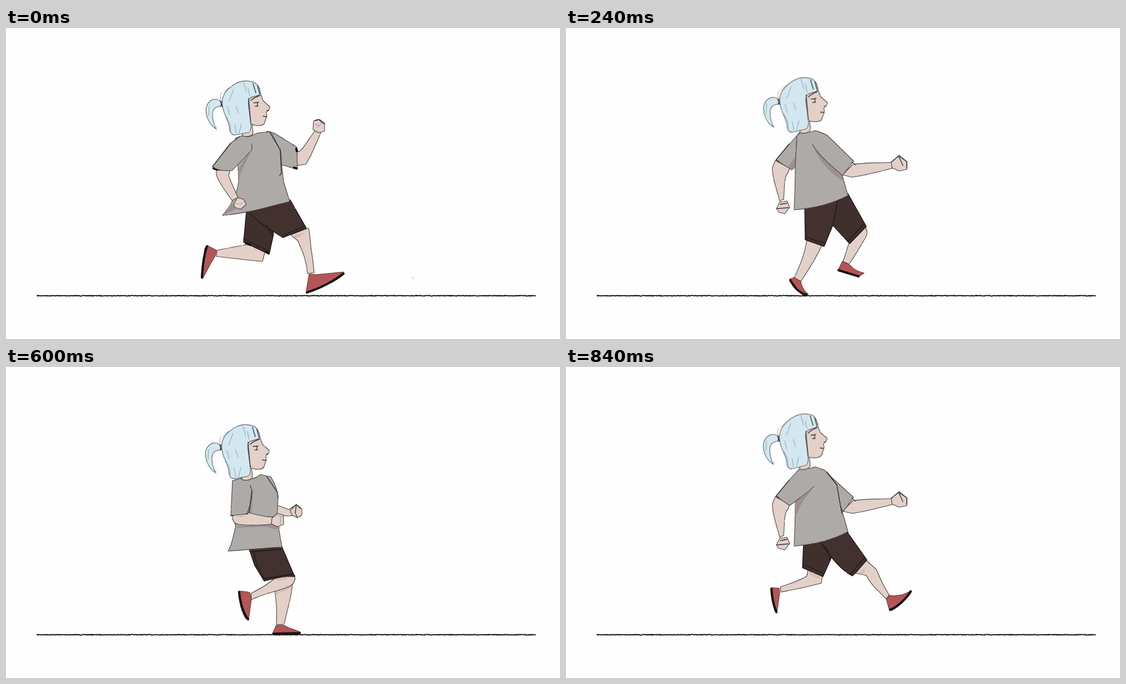
Recreate the animation shown at these times as an HTML page. Size 998x561 px, loop 960 ms.

```html
<!DOCTYPE html>
<html lang="en">
<head>
<meta charset="utf-8">
<title>Run cycle</title>
<style>
html, body { margin: 0; width: 100%; height: 100%; overflow: hidden; background: #fefefe; }
svg { display: block; width: 100%; height: 100%; }
path { fill: none; stroke: #4b4442; stroke-width: 1.1; stroke-linejoin: round; stroke-linecap: round; }
.skin { fill: #e2d0c9; }
.hair { fill: #d3e7f1; stroke: #59656d; }
.shirt { fill: #aeaaa7; stroke: #494543; }
.shade { fill: #9b918e; stroke: none; }
.blush { fill: #d8beb5; stroke: none; }
.near { fill: #43312f; stroke: #1f1716; stroke-width: 1.4; }
.far { fill: #40302d; stroke: #1f1716; stroke-width: 1.4; }
.fold { stroke: #1f1716; stroke-width: 1.3; }
.shoe { fill: #b55558; stroke: #6d3536; }
.sole { stroke: #161313; stroke-width: 4.2; }
.ink { stroke: #37312f; stroke-width: 1.35; }
.strand { stroke: #8698a2; stroke-width: .9; }
.ground { stroke: #111; stroke-width: 1.8; }
</style>
</head>
<body>
<svg id="stage" viewBox="0 0 998 561">
  <filter id="pencil" filterUnits="userSpaceOnUse" x="340" y="70" width="300" height="420" color-interpolation-filters="sRGB">
    <feTurbulence type="fractalNoise" baseFrequency=".25" numOctaves="2" seed="4"/>
    <feDisplacementMap in="SourceGraphic" scale="1.7" xChannelSelector="R" yChannelSelector="G"/>
  </filter>
</svg>
<script>
const NS = 'http://www.w3.org/2000/svg';
const stage = document.getElementById('stage');
const STEP = 120;

function add(parent, tag, attrs) {
  const el = document.createElementNS(NS, tag);
  for (const name in attrs) el.setAttribute(name, attrs[name]);
  return parent.appendChild(el);
}

// Each part is "class path-data", listed from back to front.
function draw(parent, parts, transform = '') {
  const g = add(parent, 'g', { transform });
  for (const part of parts) {
    const cut = part.indexOf(' ');
    add(g, 'path', { class: part.slice(0, cut), d: part.slice(cut + 1) });
  }
}

const head = [
  'skin M428 188L443 172L445 188C445 195 434 198 425 194Z',
  'skin M436 127L459 120L463 131L475 142C477 146 471 149 469 152L470 159L465 173C460 177 451 177 439 173Z',
  'hair M388 133C380 126 367 126 361 142C358 157 366 174 378 182C371 165 370 150 376 145C380 141 385 142 388 141Z',
  'hair M403 108C415 97 430 92 447 98C455 102 458 111 459 120L442 125C436 128 436 134 437 142L441 172C442 184 440 188 434 189L413 193C404 193 403 187 402 176C398 162 391 153 390 140C388 126 394 115 403 108Z',
  'strand M428 98L433 116M410 111L402 132M399 142L403 157M414 140L419 154M424 173L420 190M412 174L415 190M366 140L365 158M372 164L376 177M436 108L439 122',
  'ink M445 100L450 117M453 104L457 119M437 127L441 172M386 132L390 142M388 133L387 142',
  'strand M402 107L392 116M389 132C384 124 386 121 389 117M379 178L379 184M398 161L404 174L405 190',
  'ink M441 131Q447 125 457 122M446 135L455 134M449 141L454 141M453 134L453 140M463 159L469 160M470 149L473 149',
];

const shoes = {
  contact: [
    'skin M434 388C446 394 457 396 467 402L462 421C440 419 405 415 379 412L380 401C400 397 420 393 434 391Z',
    'shoe M362 392L379 401L377 411C368 425 361 440 354 452L352 447L358 398Z',
    'sole M362 394C356 410 354 432 353 450',
    'skin M513 373L545 361L547 371C548 395 554 420 555 442L543 443C541 415 532 400 526 384Z',
    'shoe M546 444L558 445L608 440C600 451 570 466 545 477L541 474Z',
    'sole M542 477C565 470 592 456 608 443',
    'blush M514 375L539 368L530 377L523 378Z', 'blush M438 391L458 395L465 402L447 397Z',
  ],
  flight: [
    'skin M436 364L462 376L460 390C436 396 410 402 387 406L386 397C405 390 425 384 434 377Z',
    'shoe M370 398L384 399L385 407L380 443L376 440Z',
    'sole M370 400C371 415 374 431 379 442',
    'skin M522 372L541 349L559 365C566 382 575 400 582 411L577 419C565 405 550 395 541 376Z',
    'shoe M577 418L583 412C600 414 612 410 622 403C622 411 600 431 587 439L582 437Z',
    'sole M584 438C596 434 613 418 621 405',
    'blush M527 371L539 363L537 374Z', 'blush M437 368L459 379L455 382L438 375Z',
  ],
};

const swingShoe = [
  'shoe M419 404L439 406L442 419L437 456L432 454C424 440 419 420 419 404Z',
  'sole M420 406C422 426 427 444 436 455',
];
const standLeg = [
  'skin M481 386L517 382C516 410 506 440 501 464L487 465C489 440 487 415 481 386Z',
  'shoe M487 466L501 466C512 473 526 475 531 479L480 481Z',
  'sole M482 481L529 480',
];

const contactTorso = 'shirt M413 199C422 194 429 194 434 196C441 197 447 191 455 189L477 187L495 222L497 250L500 277L511 313C480 320 440 334 390 338C402 325 417 300 419 277L418 250Z';
const contactBack = 'skin M379 257C377 266 385 278 391 288L407 311L418 306C412 292 405 278 401 266L404 256Z';
const contactFront = [
  'skin M523 218C528 232 536 214 556 186L567 189C560 206 549 232 540 246L524 248Z',
  'skin M553 183L554 168L565 165L574 172L574 186L563 189Z',
  'strand M555 173L565 176L568 170M559 179L565 176',
  'ink M556 167L563 165L573 173',
];
const cuffs = 'sole M374 253L382 256M523 218L524 222M519 252L523 253';

const nearArmBack = [
  ...contactFront,
  'shirt M470 186L484 190L524 215L525 255L497 247L480 220Z',
  contactTorso,
  'shade M441 223C430 235 424 245 418 258L419 278C423 256 434 240 441 223Z',
  'shade M406 314L394 336L414 327Z',
  cuffs,
  contactBack,
  'shirt M421 196L404 208L372 250C380 257 395 258 407 257C418 247 431 233 443 220L443 209',
  'ink M475 188L494 220L496 262L493 266M372 250L404 209',
  'skin M410 318L417 306L428 309L433 318L423 327L413 324Z',
  'strand M412 317L424 317L431 312',
];
const nearArmFront = [
  contactBack,
  'shirt M424 196L404 208L372 250C380 257 395 258 407 257L418 243Z',
  'shade M418 233L400 256L408 257L418 247Z',
  contactTorso,
  'shade M443 223L497 249L499 273C480 263 460 246 443 223Z',
  cuffs,
  ...contactFront,
  'shirt M448 190L484 190L525 217L523 255C499 247 465 243 439 219',
  'ink M424 197C421 215 418 230 418 248M372 250L404 209M498 250L494 262',
];

const passTop = [
  'skin M487 249L510 257L517 252L517 268C507 270 496 268 486 265Z',
  'skin M512 259L523 248L533 256L533 267L525 272L515 267Z',
  'ink M516 254L523 248L521 264L525 271M524 249L530 255',
  'shirt M409 205L426 200C440 204 450 202 458 194L477 198C485 211 490 225 490 237L488 271L497 325C470 326 430 330 400 332C408 320 410 300 414 287L407 266Z',
  'shade M443 222L434 264L441 266C445 250 444 236 443 222Z',
  'shade M415 287L485 284L495 290L485 293L470 288L417 290Z',
  'skin M408 265C406 276 412 284 420 284C440 287 465 285 486 283L489 268C481 273 465 270 434 262Z',
  'blush M411 269L436 264L425 271Z',
  'shirt M426 200L408 205L405 268L434 265C440 250 444 234 443 222L440 213',
  'ink M470 198L489 226L490 236M443 222L438 263M405 268L410 268M432 265L436 265',
  'skin M479 273L489 264L500 267L500 284L489 288L478 283Z',
  'strand M488 266L495 270L494 286M495 270L500 267',
];

const flightBack = [
  'skin M377 234L403 248L400 256C392 264 394 285 392 304L385 307C379 285 371 262 372 246Z',
  'skin M379 321L385 309L398 307L403 318L394 330L383 327Z',
  'ink M380 321L401 319M386 313L398 311',
];
const flightFront = [
  'skin M498 260L517 241C545 237 570 239 586 237L588 248C560 255 535 262 515 264Z',
  'skin M586 237L599 226L614 236L614 250L600 253L587 247Z',
  'ink M587 236L599 226L607 243M600 225L614 236L614 248',
];
const flightTorso = 'shirt M416 189L425 181C434 184 442 183 449 180L466 186L488 213L494 248L498 262L508 297C480 312 450 320 411 323C412 300 413 270 413 245Z';
const flightNearFront = [
  ...flightBack,
  'shirt M423 181L378 233L407 251L413 246L416 190Z',
  'shade M414 226L400 246L407 251L413 247Z',
  flightTorso,
  'shade M446 212L497 257L498 270C480 260 460 240 446 212Z',
  ...flightFront,
  'shirt M452 181L470 188L518 235L498 261C480 245 455 225 444 205',
  'ink M379 232L402 204M515 237L522 242M379 233L384 236',
];
const flightNearBack = [
  ...flightFront,
  'shirt M464 186L518 235L500 260L484 248L478 213Z',
  flightTorso,
  'shade M444 220C428 238 418 255 413 275L413 243Z',
  ...flightBack,
  'shirt M423 181L403 203L378 233L403 250C415 240 436 227 447 215',
  'ink M470 189L488 213L494 248L497 264M379 232L402 204M515 237L522 242M379 233L384 236',
];

const pushLegs = [
  'skin M434 381L462 390C452 412 436 438 423 457L411 451C421 430 431 405 434 381Z',
  'shoe M411 450L423 457C424 466 429 474 436 480L427 482C417 474 409 464 403 453Z',
  'sole M404 455C411 467 419 478 433 481',
  'skin M510 386L537 357C546 366 543 375 536 384C527 400 518 414 510 426L499 421C504 406 508 395 510 386Z',
  'shoe M498 421L511 427C517 435 528 440 537 442L528 448L490 437Z',
  'sole M491 437L527 448',
];

const poses = [
  { head: '', parts: [
    ...shoes.contact,
    'far M433 332L428 386L474 408L482 372L470 334Z',
    'near M440 330L512 310L541 361L499 378C480 366 455 352 440 334Z',
    'fold M428 380L472 402M499 374L539 357M470 357L479 374',
    'sole M432 388L440 391M469 404L473 406',
    ...nearArmBack] },
  { head: 'translate(-1 8.5)', parts: [
    'skin M440 408C455 402 465 396 472 387L490 388L483 402C470 406 455 412 442 420Z',
    ...swingShoe,
    'skin M508 384L523 383L522 391L514 394Z',
    ...standLeg,
    'blush M484 392L513 389L499 398L489 400Z',
    'far M494 321L497 324L522 382L508 385Z',
    'near M438 327L496 322L514 386C500 389 482 387 468 390L455 372L444 354Z',
    'fold M497 328L516 383M466 387L514 382M444 346Q446 335 460 332',
    ...passTop] },
  { head: 'matrix(1 -.045 0 1 -4.5 13.5)', parts: [
    ...pushLegs,
    'far M483 308L508 299L541 358L511 389L479 354Z',
    'near M430 320L431 382L465 394L481 355L490 306Z',
    'fold M431 377L465 388M508 384L537 354'],
    top: flightNearFront },
  { head: 'matrix(1 -.07 0 1 -5 19.5)', parts: [
    ...shoes.flight,
    'far M486 303L506 297L542 348L516 377C500 372 488 356 481 340Z',
    'near M428 318L426 362L463 378L481 340L489 303Z',
    'fold M427 356L463 372M512 374L538 344M488 310Q483 326 484 340',
    ...flightNearFront] },
  { head: '', parts: [
    ...shoes.contact,
    'far M494 314L512 310L541 361L499 378L486 372Z',
    'near M433 332L428 386L474 408L489 370L498 315Z',
    'fold M428 380L472 402M499 374L539 357M434 348Q442 337 470 333',
    'sole M432 388L440 391M469 404L473 406',
    ...nearArmFront] },
  { head: 'translate(-1 8.5)', parts: [
    ...standLeg,
    'blush M485 402L516 395L509 401L486 411Z',
    'skin M442 408C460 399 475 390 485 380L520 375C522 386 518 393 508 397C490 404 460 410 442 420Z',
    ...swingShoe,
    'blush M484 383L518 377L505 383L490 386Z',
    'near M438 328L496 322L520 378C500 376 480 383 465 386L448 358Z',
    'fold M447 334Q449 360 467 383M463 382L518 373M443 333L495 329',
    ...passTop] },
  { head: 'matrix(1 -.045 0 1 -4.5 13.5)', parts: [
    ...pushLegs.slice(0, 3),
    'far M430 320L431 382L465 394L481 355L470 312Z',
    ...pushLegs.slice(3),
    'near M454 316L508 299L541 358L511 389C490 372 470 348 454 320Z',
    'fold M431 377L465 388M508 384L537 354'],
    top: flightNearBack },
  { head: 'matrix(1 -.07 0 1 -5 19.5)', parts: [
    ...shoes.flight,
    'far M428 318L426 362L463 378L479 342L462 312Z',
    'near M457 313L506 297L542 348L516 377C492 364 475 340 459 317Z',
    'fold M427 356L463 372M512 374L538 344M464 322Q474 330 475 347',
    ...flightNearBack] },
];

// Rough ground stroke from seeded noise.
let seed = 7;
const rand = () => (seed = seed * 16807 % 2147483647) / 2147483647;
let ridge = 'M56 483';
for (let x = 57; x <= 954; x += .8) ridge += `L${x.toFixed(1)} ${(482.3 + rand() * 1.3).toFixed(1)}`;
add(stage, 'path', { class: 'ground', d: ridge });

const speck = add(stage, 'circle', { cx: 732.5, cy: 451, r: 2.2, fill: '#e3e3e3' });
const figures = poses.map(pose => {
  const g = add(stage, 'g', { filter: 'url(#pencil)' });
  draw(g, pose.parts);
  if (pose.top) draw(g, pose.top, 'translate(0 5)');
  draw(g, head, pose.head);
  return g;
});

function update(time) {
  const current = Math.floor(time / STEP) % figures.length;
  figures.forEach((g, i) => g.setAttribute('display', i === current ? 'inline' : 'none'));
  speck.setAttribute('display', current === 0 ? 'inline' : 'none');
}

const start = performance.now();
function tick() {
  update(performance.now() - start);
  requestAnimationFrame(tick);
}
update(0);
requestAnimationFrame(tick);
</script>
</body>
</html>
```
